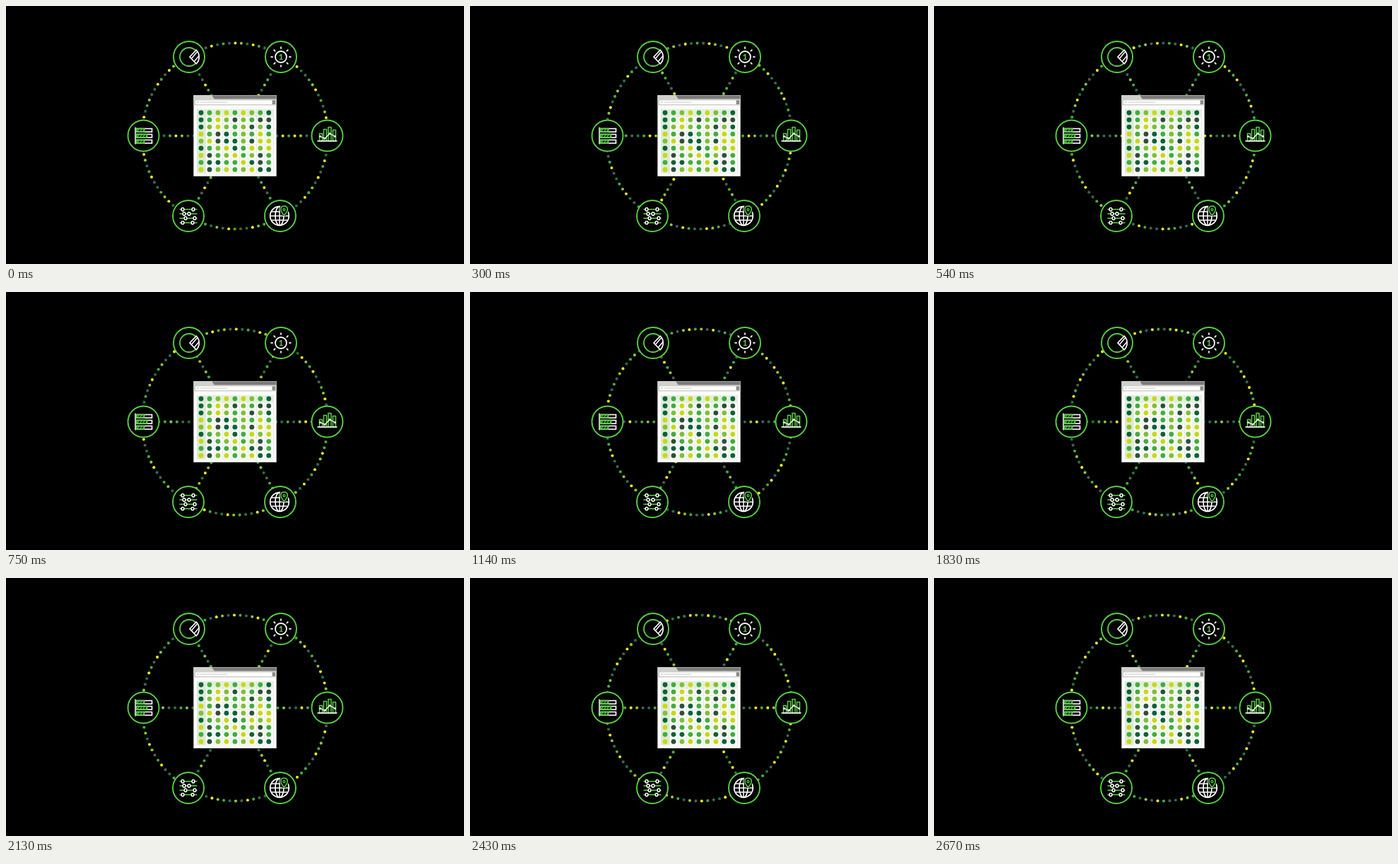
These frames come from a looping animation (648 by 365 pixels, 2.7 s). An HTML page with a canvas:

```html
<!DOCTYPE html>
<html lang="en">
<head>
<meta charset="utf-8">
<style>
  html, body { margin: 0; width: 100%; height: 100%; overflow: hidden; background: #000; }
  canvas { display: block; }
</style>
</head>
<body>
<canvas id="stage" width="648" height="365"></canvas>
<script>
const stage = document.getElementById('stage');
const ctx = stage.getContext('2d');
const LOOP = 2700, STEP = 30, SLOTS = 15, GAP = 8.47;
const CENTER = [324, 184], RADIUS = 131.5;
const GREEN = '#58cf43', WHITE = '#fff';
const FLOW = { Y: '#eaea20', L: '#8cc63f', G: '#45ad3e', D: '#20704a', K: '#476154' };
const CELL = { Y: '#c8d814', L: '#80bf35', G: '#3fae3c', D: '#08623a', K: '#2d4f38' };

// Colour sequences, clockwise from the left icon
const ARCS = ['GKLYDGLKDYGKYLD', 'YGLKYDGKYLDYGKL', 'YLGYDKGLYDGKLYD',
              'GYLDYGKYDLGYKDG', 'YDKGLYDKGYKLDGL', 'LGKDYLGDKYGKLYD'];
const SPOKES = ['LGKDGYLKDGLKYDG', 'KLGDKYGDLKGDYGL', 'GDLKGLDYKGLDGYK',
                'LKGDLYGYDKLGDKY', 'KDLGKYGDYLKGDLG', 'DYLGKYDLGKDGKYL'];
const CELLS = ['DGLYGYLGD', 'DGYLKLGKK', 'DLYLGLKLD', 'YGKDGLGYG', 'LYKDDLKYY',
               'DGLYDGYLY', 'YKGLYGLKG', 'GDDGGYDKG', 'YKLYGLYDD'];
const HUBS = [[194.5, 183.5], [259, 72], [389, 72], [454.5, 183.5], [388, 297], [258, 297]];

function disc(x, y, r, fill) {
  ctx.beginPath();
  ctx.arc(x, y, r, 0, 7);
  ctx.fillStyle = fill;
  ctx.fill();
}

function ring(x, y, r, color, width, from = 0, to = Math.PI * 2) {
  ctx.beginPath();
  ctx.arc(x, y, r, from, to);
  ctx.strokeStyle = color;
  ctx.lineWidth = width;
  ctx.stroke();
}

function line(points, color, width = 1.5) {
  ctx.beginPath();
  points.forEach(([x, y]) => ctx.lineTo(x, y));
  ctx.strokeStyle = color;
  ctx.lineWidth = width;
  ctx.stroke();
}

function rect(x, y, w, h, fill) {
  ctx.fillStyle = fill;
  ctx.fillRect(x, y, w, h);
}

function frame(x, y, w, h, color, width = 1.5) {
  ctx.strokeStyle = color;
  ctx.lineWidth = width;
  ctx.strokeRect(x, y, w, h);
}

function flow(colors, length, start, shift, place) {
  for (let i = -SLOTS; i < 2 * SLOTS; i++) {
    const s = i * GAP + start + shift;
    if (s < 18 || s > length) continue;
    disc(...place(s), 2.05, FLOW[colors[(i + SLOTS) % SLOTS]]);
  }
}

function drawFlows(shift) {
  HUBS.forEach(([hx, hy], i) => {
    const from = Math.PI * (1 + i / 3);
    flow(ARCS[i], 120, 1.5, shift, s => [
      CENTER[0] + RADIUS * Math.cos(from + s / RADIUS),
      CENTER[1] + RADIUS * Math.sin(from + s / RADIUS)
    ]);
    const dx = CENTER[0] - hx, dy = CENTER[1] - hy, d = Math.hypot(dx, dy);
    flow(SPOKES[i], 78, 3.6, shift, s => [hx + dx * s / d, hy + dy * s / d]);
  });
}

function drawWindow() {
  rect(265.5, 126, 117, 115, '#fbfcfa');
  rect(265.5, 126, 117, 6, '#7b7c7a');
  ctx.beginPath();
  [[265.5, 126], [291, 126], [295, 132], [265.5, 132]].forEach(p => ctx.lineTo(...p));
  ctx.fillStyle = '#d0d1cd';
  ctx.fill();
  rect(265.5, 131.5, 117, 9, '#cfd0cc');
  rect(268, 133.5, 108, 5.5, WHITE);
  rect(270, 135.6, 3, 1, '#bbb');
  rect(275, 135.6, 38, 1, '#c9c9c9');
  rect(377, 133.5, 4, 5.5, '#8d8e8b');
  rect(270, 146, 108, 10, '#e6f1df');
  rect(270, 146, 12, 90, '#dcebd3');
  for (let i = 0; i <= 9; i++) {
    rect(270 + i * 12, 146, 0.7, 90, '#dfe7dc');
    rect(270, 146 + i * 10.05, 108, 0.7, '#e4eae1');
  }
  CELLS.forEach((row, r) => [...row].forEach((c, i) =>
    disc(276 + i * 11.97, 151 + r * 10.05, 3.4, CELL[c])));
  frame(265.75, 126.25, 116.5, 114.5, '#c9cbc7', 0.5);
}

function barsIcon() {
  line([[-11.5, -12], [-11.5, 12]], WHITE);
  [11, 15, 11].forEach((w, i) => {
    const y = -10 + i * 8;
    frame(-10, y, 22, 4.6, WHITE, 1.6);
    frame(-10, y, w, 4.6, GREEN, 1.6);
    for (let x = -9; x < w - 11; x += 4) line([[x, y + 4.6], [x + 3, y]], GREEN, 1.3);
  });
}

function pieIcon() {
  ring(0, 0, 13, GREEN, 1.8, 0.8, Math.PI * 2 - 0.8);
  ctx.save();
  ctx.beginPath();
  ctx.moveTo(1, 0);
  ctx.arc(0, 0, 14.2, -0.76, 0.76);
  ctx.closePath();
  ctx.fillStyle = '#000';
  ctx.fill();
  ctx.strokeStyle = WHITE;
  ctx.lineWidth = 1.7;
  ctx.stroke();
  ctx.clip();
  for (let k = 0; k < 3; k++) line([[2 + k * 4, 4 + k * 4], [13 + k * 4, -9 + k * 4]], WHITE, 1.5);
  ctx.restore();
}

function sunIcon() {
  ring(0, 0, 8, WHITE, 1.8);
  for (let k = 0; k < 8; k++) {
    const c = Math.cos(k * Math.PI / 4), s = Math.sin(k * Math.PI / 4);
    line([[c * 11.2, s * 11.2], [c * 14.6, s * 14.6]], WHITE, 1.7);
  }
  ctx.fillStyle = GREEN;
  ctx.font = 'bold 12px Lato, sans-serif';
  ctx.textAlign = 'center';
  ctx.textBaseline = 'alphabetic';
  ctx.fillText('1', 0, 4.3);
}

function chartIcon() {
  [[-11, -3], [-5, -9], [1.5, -12], [8, -8]].forEach(([x, top]) =>
    frame(x, top, 4, 7.5 - top, GREEN, 1.5));
  line([[-14, 7.5], [14, 7.5]], WHITE, 1.6);
  const trend = [[-10, 1], [-3.5, 4], [3.5, -3], [11, 1]];
  line(trend, WHITE, 1.3);
  trend.forEach(([x, y]) => disc(x, y, 1.5, WHITE));
}

function globeIcon() {
  ring(-1, 0, 13.3, WHITE, 1.7);
  ctx.beginPath();
  ctx.ellipse(-1, 0, 6, 13.3, 0, 0, 7);
  ctx.stroke();
  line([[-1, -13], [-1, 13]], WHITE);
  line([[-14, 0], [12, 0]], WHITE);
  line([[-12.5, -6], [10, -6]], WHITE);
  line([[-12.5, 6], [10, 6]], WHITE);
  ctx.beginPath();
  ctx.moveTo(5.5, -1);
  ctx.bezierCurveTo(-1.5, -8, 0, -14, 5.5, -14);
  ctx.bezierCurveTo(11, -14, 12.5, -8, 5.5, -1);
  ctx.fillStyle = '#000';
  ctx.fill();
  ctx.lineWidth = 3.5;
  ctx.strokeStyle = '#000';
  ctx.stroke();
  ctx.lineWidth = 1.6;
  ctx.strokeStyle = GREEN;
  ctx.stroke();
  ring(5.5, -8.8, 1.5, GREEN, 1.3);
}

function slidersIcon() {
  [[-8, 7], [-6, 1], [-4, 9], [-8, 6]].forEach((knobs, i) => {
    const y = -9.3 + i * 6.3;
    line([[-12.5, y], [12.5, y]], GREEN, 1.6);
    knobs.forEach(x => {
      ctx.beginPath();
      ctx.ellipse(x, y, 1.9, 2.2, 0, 0, 7);
      ctx.fillStyle = '#000';
      ctx.fill();
      ctx.strokeStyle = WHITE;
      ctx.lineWidth = 1.5;
      ctx.stroke();
    });
  });
}

const ICONS = [barsIcon, pieIcon, sunIcon, chartIcon, globeIcon, slidersIcon];

function draw(now) {
  const time = Math.floor((now % LOOP) / STEP) * STEP;
  rect(0, 0, 648, 365, '#000');
  drawFlows(time / LOOP * SLOTS * GAP);
  drawWindow();
  HUBS.forEach(([x, y], i) => {
    disc(x, y, 22, '#000');
    ring(x, y, 22, GREEN, 1.9);
    ctx.save();
    ctx.translate(x, y);
    ICONS[i]();
    ctx.restore();
  });
  requestAnimationFrame(draw);
}

requestAnimationFrame(draw);
</script>
</body>
</html>
```
